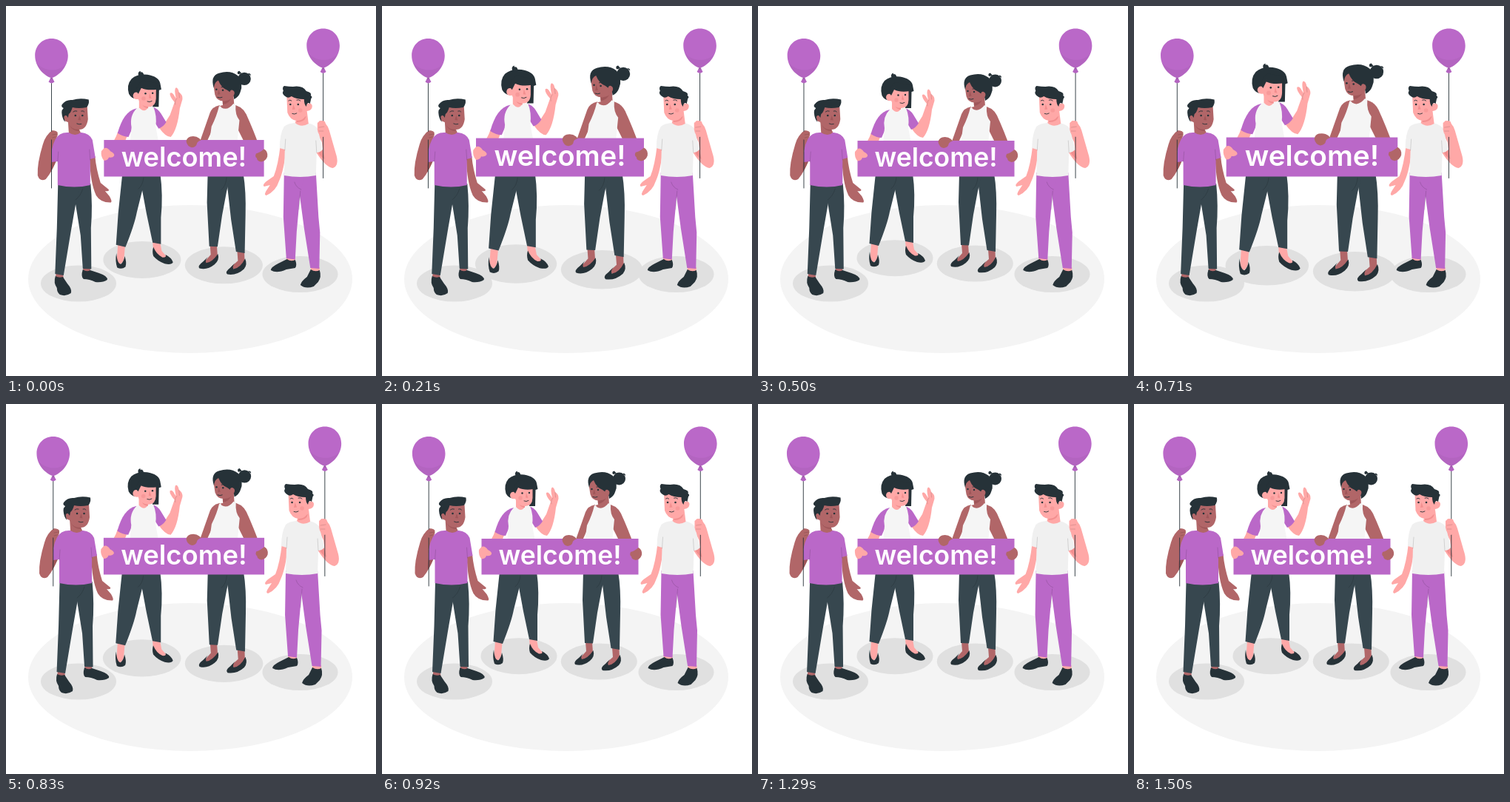
Animation, 500 px wide and 500 px high, one loop 1.54 s. Source, as an HTML page:

```html
<!DOCTYPE html>
<html lang="en">
<head>
<meta charset="utf-8">
<title>Welcome</title>
<style>
html, body { margin: 0; width: 100%; height: 100%; overflow: hidden; background: #fff; }
svg { display: block; width: 100vw; height: 100vh; }
.purple { fill: #ba68c8; }
.ink { fill: #263238; }
.slate { fill: #37474f; }
.brown { fill: #b16668; }
.deep { fill: #9f5659; }
.pink { fill: #ffa8a7; }
.rose { fill: #f28f8f; }
.white { fill: #f5f5f5; }
.gray { fill: #f0f0f0; }
.ground { fill: #e0e0e0; }
.shade { fill: #000; opacity: .1; }
.line { fill: none; stroke: #263238; stroke-width: .9; stroke-linecap: round; }
.fold { fill: none; stroke: #000; stroke-opacity: .17; stroke-width: .8; stroke-linecap: round; }
text { font: 600 35.5px Inter, "Open Sans", sans-serif; fill: #fff; text-anchor: middle; }
</style>
</head>
<body>
<svg viewBox="0 0 500 500">
  <defs>
    <g id="balloon">
      <path class="line" d="M0 58V202"/>
      <path class="purple" d="M0 0C13 0 22.3 10 22.3 23C22.3 37 12 49 1 53L4 58.500Q2 60 0 60.500Q-2 60-4 58.500L-1 53C-12 49-22.3 37-22.3 23C-22.3 10-13 0 0 0Z"/>
      <path class="shade" style="opacity:.04" d="M-21 32C-13 43 7 47 19 35C14 45 7 51 1 53L4 58.500Q0 61-4 58.500L-1 53C-10 50-18 42-21 32Z"/>
      <path class="shade" d="M-2 53H2L2.4 55H-2.4Z"/>
    </g>
  </defs>

  <ellipse cx="249" cy="369" rx="219" ry="100" fill="#f4f4f4"/>
  <ellipse class="ground" cx="98" cy="375" rx="51" ry="24.5"/>
  <ellipse class="ground" cx="397.5" cy="362.5" rx="51" ry="24.5"/>

  <g id="center">
    <ellipse class="ground" cx="185" cy="340.7" rx="51.5" ry="24.5"/>
    <ellipse class="ground" cx="293.3" cy="348" rx="51.5" ry="24.5"/>

    <!-- waving woman -->
    <path class="pink" d="M153 320L162.500 322L161 340Q158 348 153 346Q150 341 152 335Z"/>
    <path class="pink" d="M199 317L209 318L211 329L219 338Q217 343 211 340L200 330Z"/>
    <path class="ink" d="M151 332Q152 346 157 346.500Q161 343 162 336Q165 345 163 350Q158 354 152 351Q149 342 151 332Z"/>
    <path class="ink" d="M200 324Q204 334 212 337.500Q218 338 216 334Q224 338 226 344Q224 348 215 346Q206 343 200 336Q198 330 200 324Z"/>
    <path class="slate" d="M181 226H209Q213 255 210 285L210 320L199 318L191 280Z"/>
    <path class="slate" d="M159 226H191L186 246L178 278Q175 294 163 324L150.500 321L153.500 278Z"/>
    <path class="fold" d="M187 232Q186 242 180 247"/>
    <path class="pink" d="M153 171L166 175L159 192L145 199L140 192Q149 184 153 171Z"/>
    <path class="purple" d="M178 140C165 143 158 154 152.500 173Q160 178 167 178L177 155Z"/>
    <path class="pink" d="M215 160L222 149L228 132Q221 124 222 120Q225 118 228 124L230 127Q227 114 230 112.500Q233 113 234 119Q239 122 238.500 128L235 140Q232 168 223 178Q216 178 207 165Z"/>
    <path class="fold" d="M234 119L234.500 126M231 127Q228 130 229 135"/>
    <path class="purple" d="M198 138Q206 140 210 147L217 158.500Q213 165 207 167L200 156Z"/>
    <path class="white" d="M178 140Q190 137 200 138Q205 150 203 164L207 186H169L171 165Q168 150 178 140Z"/>
    <path class="ink" d="M171 101Q179 94 192 95.500Q207 98 209 107L210.500 115L207.500 116L207 138H199L201 122L180 127Q172 129 167.500 121Q164 109 171 101Z"/>
    <path class="ink" d="M181 98Q178 92 183 90.500Q182 93 185 92Q188 94 187 98Z"/>
    <path class="pink" d="M181 126V139Q188 147 193 139V132Z"/>
    <path class="rose" d="M185 135L193 136V140Q188 140 185 135Z"/>
    <path class="pink" d="M179 113H203.500L203.500 127Q203 138 194 138Q183 138 180 128Q173 129 173 123Q174 118 179 119Z"/>
    <path class="ink" d="M177 117Q179 107 186 103L205 107V115Q192 117 184 113L180 121Z"/>
    <circle class="rose" cx="187" cy="127" r="2.700" opacity=".6"/>
    <circle class="ink" cx="189.500" cy="120.500" r="1.200"/><circle class="ink" cx="199" cy="120" r="1.200"/>
    <path class="line" d="M192 131Q195 132.500 198 130.500"/>
    <path class="rose" d="M195 120L197.500 127L194 126.500Z"/>

    <!-- woman with bun -->
    <path class="brown" d="M275 321H284L285 336L277 345Q270 347 268 343L276 334Z"/>
    <path class="brown" d="M311 329L320.500 330L321 345L313 353Q306 355 303 350L312 342Z"/>
    <path class="ink" d="M272 337Q268 342 270 345Q278 344 285.500 333Q288 341 281 347Q271 355 261 352Q258 349 266 343Z"/>
    <path class="ink" d="M308 345Q304 350 306 353Q315 352 321.500 339Q325 347 320 353Q310 362 298 360Q294 357 302 351Z"/>
    <path class="slate" d="M296 226H319Q323 250 322 282L321 332L309.500 330L303 288Z"/>
    <path class="slate" d="M272 226H303L297 250L291 282L285 323.500L274 323L271 265Z"/>
    <path class="fold" d="M297 232Q296 243 290 248"/>
    <path class="brown" d="M288 136Q278 138 275 146L262 183L271 184L281 162Z"/>
    <path class="brown" d="M303 135Q317 136 323 148Q333 170 340 190H323L309 162Z"/>
    <path class="brown" d="M291 126L306 121L307 136Q314 137 312 144L283 146Q285 136 292 136Z"/>
    <path class="deep" d="M292 130L304 125Q300 134 292 135Z"/>
    <path class="white" d="M287 137Q290 137 290 139Q298 144 306 134L309 136Q308 149 314 156L311 186H274L277 164Q284 150 287 137Z"/>
    <circle class="ink" cx="320.500" cy="101" r="8.500"/>
    <path class="ink" d="M312 95Q310 91 314 90.500L317 94ZM325 94Q329 93 329 97Z"/>
    <path class="brown" d="M281 103Q292 98 306 110L308 122Q303 130 294 130.500Q284 131 281.500 122L280 112Z"/>
    <path class="ink" d="M280 113Q275 97 287 93.500Q302 89 312 97Q320 108 315 119Q313 125 307 128Q306 123 306 119Q302 120 298 116Q290 113 286 103Q281 105 280 113Z"/>
    <path class="brown" d="M301 121Q301 115 305 116Q309 118 306.500 123L302 125Z"/>
    <circle class="ink" cx="283.500" cy="115" r="1.200"/><circle class="ink" cx="292" cy="116" r="1.200"/>
    <path class="line" d="M290 112Q292 111 294 113M285 125.500Q288 127 291 125.500"/>
    <path class="deep" d="M286.500 115L285 122L288.500 121.500Z"/>

    <!-- banner and hands -->
    <rect class="purple" x="134.500" y="182" width="212" height="48.500"/>
    <text x="240.500" y="217">welcome!</text>
    <path class="pink" d="M134.500 193Q139 191 143 197Q149 200 148 203Q146 206 141 205Q140 209 134.500 209.500Q130 204 131 197Z"/>
    <path class="brown" d="M249 177.500Q256 176 261 180L263 182.500Q258 184 257.500 187Q257 191 251 192Q245 191 243.500 184Q244 179 249 177.500Z"/>
    <path class="brown" d="M346.500 194Q352 197 351 204Q349 210 343 211Q337 210 337 206Q334 204 336 200Q341 199 346.500 194Z"/>
  </g>

  <g id="sides">
    <!-- man in purple shirt -->
    <path class="brown" d="M68 360L77 361L78 368H67ZM105 352H114L114 360H104Z"/>
    <path class="ink" d="M67 365Q72 368 77 366L83 375Q90 383 88 388Q81 393 73 390Q69 387 69 381Q64 374 67 365Z"/>
    <path class="ink" d="M104 356Q109 360 114 357L126 361Q138 365 137 370Q131 374 121 373Q113 369 105 369Q101 366 104 356Z"/>
    <path class="slate" d="M88 240H114.500Q117.500 270 115 300L115.500 355.500L104 355L101 310L93 260Z"/>
    <path class="slate" d="M70.500 240H102L95 264L88 304L78 364L66.500 362L69 300Z"/>
    <path class="fold" d="M104 247Q101 257 94 262"/>
    <path class="brown" d="M113 204L120.500 203Q122 220 128 239L139 248Q140 251 134 250L140 257Q144 264 142 265.500Q128 266 122 256Q114 239 113 204Z"/>
    <path class="brown" d="M63 168Q69 169 70 174L66 186L62 196L63 210L70 203Q64 222 54 234Q46 238 43 229Q42 213 50 187Q53 175 63 168Z"/>
    <path class="deep" d="M62 205L69 207Q66 215 60 225Q60 214 62 205Z"/>
    <path class="purple" d="M83 171H102Q113 172 117 181L121 205L114 207V242Q93 247 70 242V210L61.500 211Q60 193 67 180Q72 171 83 171Z"/>
    <path class="fold" d="M71 197L70 211M113 194L114 208"/>
    <path class="brown" d="M84 155L98 164L101 171Q94 177 85 171Z"/>
    <path class="deep" d="M86 161L98 165L99 169Q90 169 86 161Z"/>
    <path class="brown" d="M83 137Q95 130 110 136L111 153Q109 167 99 167Q87 167 84 157Q76 155 78 149Q80 145 84 149Z"/>
    <path class="ink" d="M78 138Q74 136 76 133Q81 126 90 127Q100 124 112 126.500Q113 133 109 137Q98 139 90 137Q88 144 85 146L84 151Q81 145 78.500 150L80 157Q76 152 75.500 144Q75.500 140 78 138Z"/>
    <circle class="ink" cx="94" cy="148" r="1.300"/><circle class="ink" cx="103.500" cy="148" r="1.300"/>
    <path class="line" d="M91 143Q93 141 96 142M102 142Q105 141 106 143M96 159Q99 160.500 102 159.500"/>
    <path class="deep" d="M99.500 148L101.500 154.500L97.500 154Z"/>
    <use href="#balloon" x="61.700" y="44"/>
    <path class="brown" d="M59 171Q67 166 70 171Q70 178 64 181L59 180Z"/>
    <path class="fold" d="M63 174L69 173M63 178L67 177"/>

    <!-- man in pale shirt -->
    <path class="pink" d="M379 339L391 340V347H380ZM412 352L424 353V361H412Z"/>
    <path class="ink" d="M380 342Q385 346 391 343Q394 350 391 354L379 356Q366 362 358 357Q358 353 368 348Z"/>
    <path class="ink" d="M412 356Q418 360 424 357Q427 366 422 373L416 379Q405 383 398 377Q399 372 407 366Z"/>
    <path class="purple" d="M393 225H419L422.500 285L424.500 306L423.500 355L411.500 354L403 300Z"/>
    <path class="purple" d="M376 225H405L398 250L393 305L391 342.500L379 341L375 285Z"/>
    <path class="fold" d="M399 248Q392 245 390 238M398 250L396 275"/>
    <path class="pink" d="M371 188L379 191Q376 222 369 237Q365 250 352 256Q348 255 353 248L357 242L349 244Q346 242 352 237L362 230Q368 215 371 188Z"/>
    <path class="pink" d="M424 155Q434 157 437 168L447 203Q450 216 442 219Q432 218 419 197L420 184L429 199L427 184L422 174Q420 162 424 155Z"/>
    <path class="rose" d="M421 196L428 194L431 207Q425 204 421 196Z"/>
    <path class="gray" d="M390 158H408Q420 161 422 168L428 194Q425 198 420 198L419 229Q398 233 376 229L377 194L370 192Q370 173 376 163Q380 159 390 158Z"/>
    <path class="fold" d="M378 180L377 195M419 182L420 198"/>
    <path class="pink" d="M393 150L407 143L409 159Q399 165 391 158Z"/>
    <path class="rose" d="M393 154L406 149Q404 157 393 157Z"/>
    <path class="pink" d="M379.500 121Q394 115 407 124L408 132Q413 130 414 135Q414 141 407 142Q405 155 393 155Q384 154 380.500 144Z"/>
    <path class="ink" d="M379 123Q372 119 375 114.500Q373 110 376 108Q383 109 388 109Q401 107 406 115Q414 117 412 121Q415 123 412.500 125L411 132Q407 129 406 136Q403 133 403 126Q392 126 386 122Q382 125 379 123Z"/>
    <circle class="rose" cx="398" cy="141" r="2.800" opacity=".55"/>
    <circle class="ink" cx="384.500" cy="133" r="1.300"/><circle class="ink" cx="395" cy="133" r="1.300"/>
    <path class="line" d="M382 128Q384 126 386 128M393 127Q396 126 398 128M387 145.500Q390 147 393 145"/>
    <path class="rose" d="M388.500 133L387 140L391 139.500Z"/>
    <use href="#balloon" x="428.800" y="30.500"/>
    <path class="pink" d="M421 158Q425 153 431 156L434 164Q434 173 429 177Q422 175 421 167Z"/>
    <path class="fold" d="M423 164L430 163M423 169L429 169"/>
  </g>
</svg>
<script>
const LOOP = 1540, CYCLE = 1500, LEAD = 30, STEP = 1000 / 24;
const CX = 240.7, CY = 230.5;
const center = document.getElementById('center');
const sides = document.getElementById('sides');

// [progress, value] stops, joined by straight lines
const beat = [[0, 1], [.1, 1.1], [.3, 1], [.4, 1], [.5, 1.1], [.6, 1], [1, 1]];
const shake = [[0, 0], [.1, -1], [.2, 2], [.3, -4], [.4, 4], [.5, -4],
               [.6, 4], [.7, -4], [.8, 2], [.9, -1], [1, 0]];

function at(stops, p) {
  const i = Math.max(1, stops.findIndex(s => s[0] >= p));
  const [p0, a] = stops[i - 1], [p1, b] = stops[i];
  return a + (b - a) * (p - p0) / (p1 - p0);
}

function draw(ms) {
  // 24 pictures a second, switching on a 10 ms grid
  const tick = Math.floor((Math.floor(ms % LOOP / 10) * 10 + 4.9) / STEP);
  const p = Math.min(1, (LEAD + tick * STEP) / CYCLE);
  center.setAttribute('transform', `translate(${CX} ${CY}) scale(${at(beat, p)}) translate(${-CX} ${-CY})`);
  sides.setAttribute('transform', `translate(${at(shake, p)} 0)`);
}

const start = performance.now();
function frame() {
  draw(performance.now() - start);
  requestAnimationFrame(frame);
}
draw(0);
requestAnimationFrame(frame);
</script>
</body>
</html>
```
